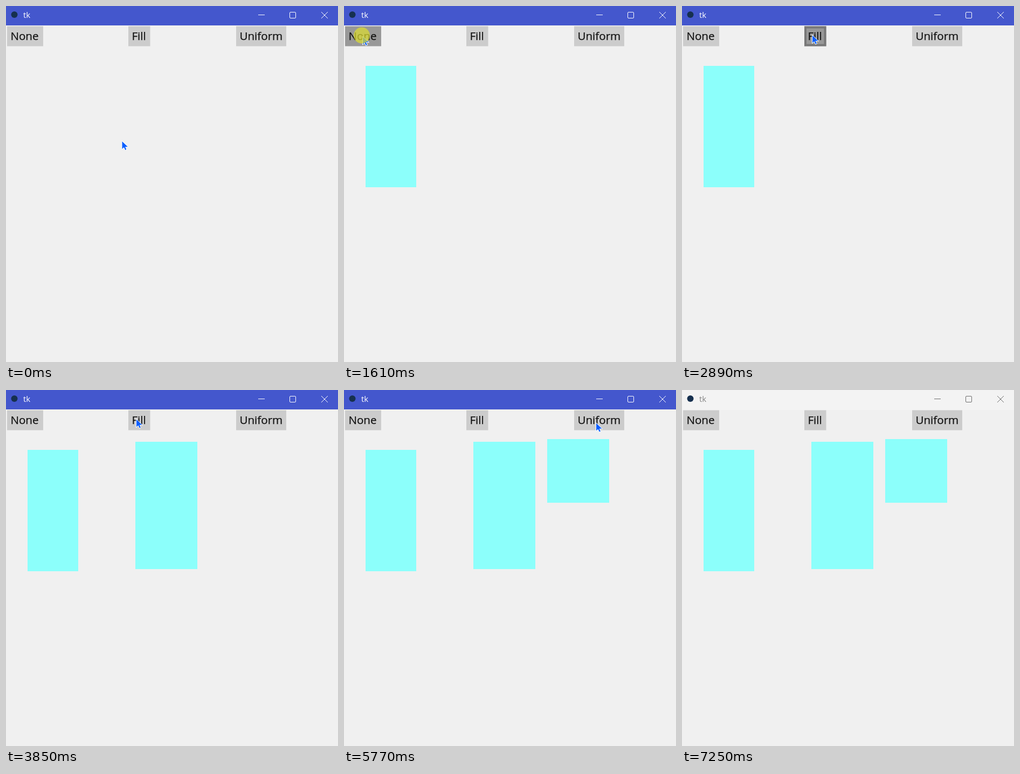
An HTML page for the animation above (7380 ms loop, 616 px wide and 660 px high).

```html
<!DOCTYPE html>
<html lang="en">
<head>
<meta charset="utf-8">
<title>tk</title>
<style>
  html, body { margin: 0; width: 100%; height: 100%; overflow: hidden; background: #f0f0f0; }
  svg { display: block; width: 616px; height: 660px; }
  text { font-family: "Open Sans", "Noto Sans", sans-serif; }
  .label { font-size: 20.6px; fill: #111; stroke: #111; stroke-width: .25px; }
</style>
</head>
<body>
<svg viewBox="0 0 616 660">
  <rect width="616" height="660" fill="#f0f0f0"/>
  <rect id="bar" width="616" height="36"/>
  <circle cx="15.5" cy="16" r="6" fill="#16304f"/>
  <text id="title" x="32" y="22" font-size="15">tk</text>
  <g id="controls" fill="none">
    <path d="M468 16.5H480M585 11L597 23M597 11L585 23"/>
    <rect x="526.5" y="11.5" width="11" height="11" rx="1.5"/>
  </g>
  <g id="buttons"></g>
  <path id="cursor" d="M0 0V16L3.7 12.6L6 17.6L9 16.3L6.8 11.6H12Z" fill="#0a5fff" stroke="#fff"/>
  <circle id="dot" r="15" fill="#dcdc32" fill-opacity=".72"/>
</svg>
<script>
const LOOP = 7380;
const $ = id => document.getElementById(id);

function add(parent, tag, attrs) {
  const el = document.createElementNS('http://www.w3.org/2000/svg', tag);
  set(el, attrs);
  parent.appendChild(el);
  return el;
}

function set(el, attrs) {
  for (const key in attrs) el.setAttribute(key, attrs[key]);
}

function show(el, on) {
  el.setAttribute('visibility', on ? 'visible' : 'hidden');
}

// press: button down, lift: click dot gone, rest: button back to normal
const buttons = [
  { text: 'None', x: 2, w: 67, press: 1610, lift: 1740, rest: 2070, pic: [40, 111, 94, 225] },
  { text: 'Fill', x: 227, w: 40.5, press: 3370, lift: 3450, rest: 3850, pic: [240, 96, 115, 236] },
  { text: 'Uniform', x: 427, w: 93, press: 5310, lift: 5380, rest: 5770, pic: [377, 91, 115, 118] }
];

const start = { x: 215, y: 250 };
const smooth = p => (1 - Math.cos(Math.PI * p)) / 2;
const moves = [
  { from: 320, to: 1020, steps: 11, x: 38, y: 62, ease: smooth },
  { from: 1090, to: 1150, steps: 2, x: 34.5, y: 56, ease: p => p },
  { from: 2350, to: 2890, steps: 9, x: 241.5, y: 53.5, ease: smooth },
  { from: 4250, to: 4780, steps: 9, x: 467.5, y: 60.5, ease: smooth },
  { from: 6170, to: 6800, steps: 10, x: 567, y: 662, ease: smooth }
];

for (const b of buttons) {
  const group = $('buttons');
  b.box = add(group, 'rect', { x: b.x, y: 37.5, width: b.w, height: 37 });
  b.ring = add(group, 'rect', {
    x: b.x + 2, y: 39.5, width: b.w - 4, height: 33,
    fill: 'none', stroke: '#787878', 'stroke-width': 4
  });
  add(group, 'text', { x: b.x + 6.4, y: 63, class: 'label' }).textContent = b.text;
  const [x, y, width, height] = b.pic;
  b.image = add(group, 'rect', { x, y, width, height, fill: '#8cfffb' });
}

// The pointer is sampled in even steps, so it jumps rather than glides.
function pointer(t) {
  let { x, y } = start;
  for (const m of moves) {
    if (t < m.from) break;
    const gap = (m.to - m.from) / (m.steps - 1);
    const step = Math.min(m.steps, Math.floor((t - m.from) / gap + 1e-6) + 1);
    const p = m.ease(step / m.steps);
    x += (m.x - x) * p;
    y += (m.y - y) * p;
  }
  return { x, y };
}

function draw(t) {
  const active = t < 7250;
  set($('bar'), { fill: active ? '#4457cd' : '#f3f3f3', height: active ? 36 : 37 });
  set($('title'), { fill: active ? '#fff' : '#858585' });
  set($('controls'), { stroke: active ? '#fff' : '#6c6c6c' });

  const { x, y } = pointer(t);
  let dot = false;
  for (const b of buttons) {
    const inside = x >= b.x && x <= b.x + b.w && y >= 37 && y <= 75;
    const hover = inside && t < b.press;
    const down = t >= b.press && t < b.rest;
    set(b.box, { fill: hover || down ? '#989898' : '#cccccc' });
    show(b.ring, hover);
    show(b.image, t >= b.press);
    dot = dot || (t >= b.press && t < b.lift);
  }

  set($('cursor'), { transform: `translate(${x} ${y})` });
  show($('cursor'), t < 6800);
  set($('dot'), { cx: x - 1.5, cy: y - 1.5 });
  show($('dot'), dot);
}

const t0 = performance.now();
function frame() {
  draw((performance.now() - t0) % LOOP);
  requestAnimationFrame(frame);
}
draw(0);
requestAnimationFrame(frame);
</script>
</body>
</html>
```
